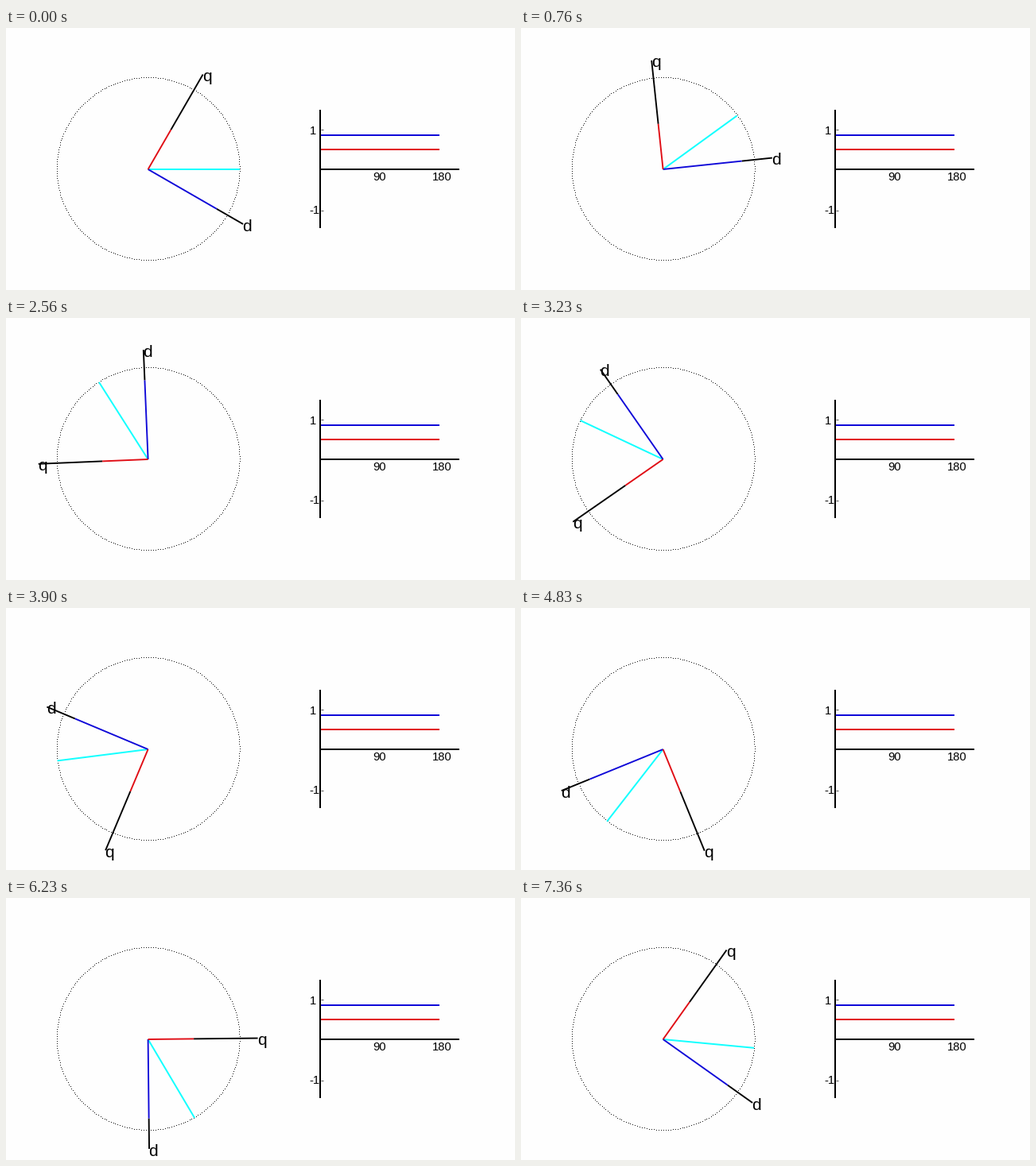
A matplotlib script that plays this animation: 640x330 px, repeating every 7430 ms.

```python
import numpy as np
import matplotlib.pyplot as plt
from matplotlib.animation import FuncAnimation

W, H, DPI = 640, 330, 100
LOOP_MS, TICKS = 7430, 446
PX = 72 / DPI               # one pixel in points
CX, CY, R = 178.6, 178, 115
STEP = 1.8                  # degrees per simulation step
LEAD = 30                   # angle between the vector and the d axis
BLUE, RED = "#0f08d8", "#e00c14"

plt.rcParams["font.family"] = "Liberation Sans"
fig = plt.figure(figsize=(W / DPI, H / DPI), dpi=DPI, facecolor="#fefefe")
ax = fig.add_axes([0, 0, 1, 1])
ax.set_xlim(0, W)
ax.set_ylim(H, 0)
ax.axis("off")


def line(xs=(), ys=(), color="black", width=1.9):
    return ax.plot(xs, ys, color=color, lw=width * PX,
                   solid_capstyle="butt")[0]


def label(x, y, text, size=14.8, ha="center"):
    return ax.text(x, y, text, fontsize=size * PX, ha=ha, va="baseline")


def polar(deg, length):
    a = np.radians(deg)
    return CX + length * np.cos(a), CY - length * np.sin(a)


# Unit circle as single-pixel dots
ax.plot(*polar(np.linspace(0, 360, 240, endpoint=False), R),
        color="#1a1a1a", marker=",", linestyle="none")

# Component plot
OX, OY, UNIT = 395, 178, 50
for value, color in ((np.cos(np.radians(LEAD)), BLUE),
                     (np.sin(np.radians(LEAD)), RED)):
    y = OY - UNIT * value
    line([OX, OX + 150], [y, y], color, 2)
line([OX, OX], [103, 252], width=2)
line([OX, 569.5], [OY, OY], width=2)
for y in (127.5, 229.5):
    line([OX + 1, OX + 4], [y, y], "#555555", 1)
label(390.5, 134.5, "1", ha="right")
label(395, 234, "-1", ha="right")
label(469.7, 191.5, "90")
label(548, 191.5, "180")

# Rotating frame: offset from the vector, component colour, name
vector = line(color="#14ffff", width=2)
arms = []
for offset, color, name in ((-LEAD, BLUE, "d"), (90 - LEAD, RED, "q")):
    part = R * np.cos(np.radians(offset))
    arms.append((offset, part, line(), line(color=color),
                 label(0, 0, name, 21, "left")))


def spoke(artist, deg, start, end):
    x, y = polar(deg, np.array([start, end]))
    artist.set_data(x, y)
    return x[1], y[1]


def update(tick):
    k = (tick + 3) // 4
    # The rotation skips some simulation steps, giving a slightly uneven pace
    angle = STEP * max(k, int(1.79 * k - 0.95))
    spoke(vector, angle, 0, R)
    for offset, part, axis, component, text in arms:
        spoke(component, angle + offset, 0, part)
        x, y = spoke(axis, angle + offset, part, 1.2 * R)
        text.set_position((x - 0.5, y + 8.7))
    return []


anim = FuncAnimation(fig, update, frames=TICKS, interval=LOOP_MS / TICKS,
                     init_func=lambda: update(0), repeat=True, repeat_delay=0)
plt.show()
```
